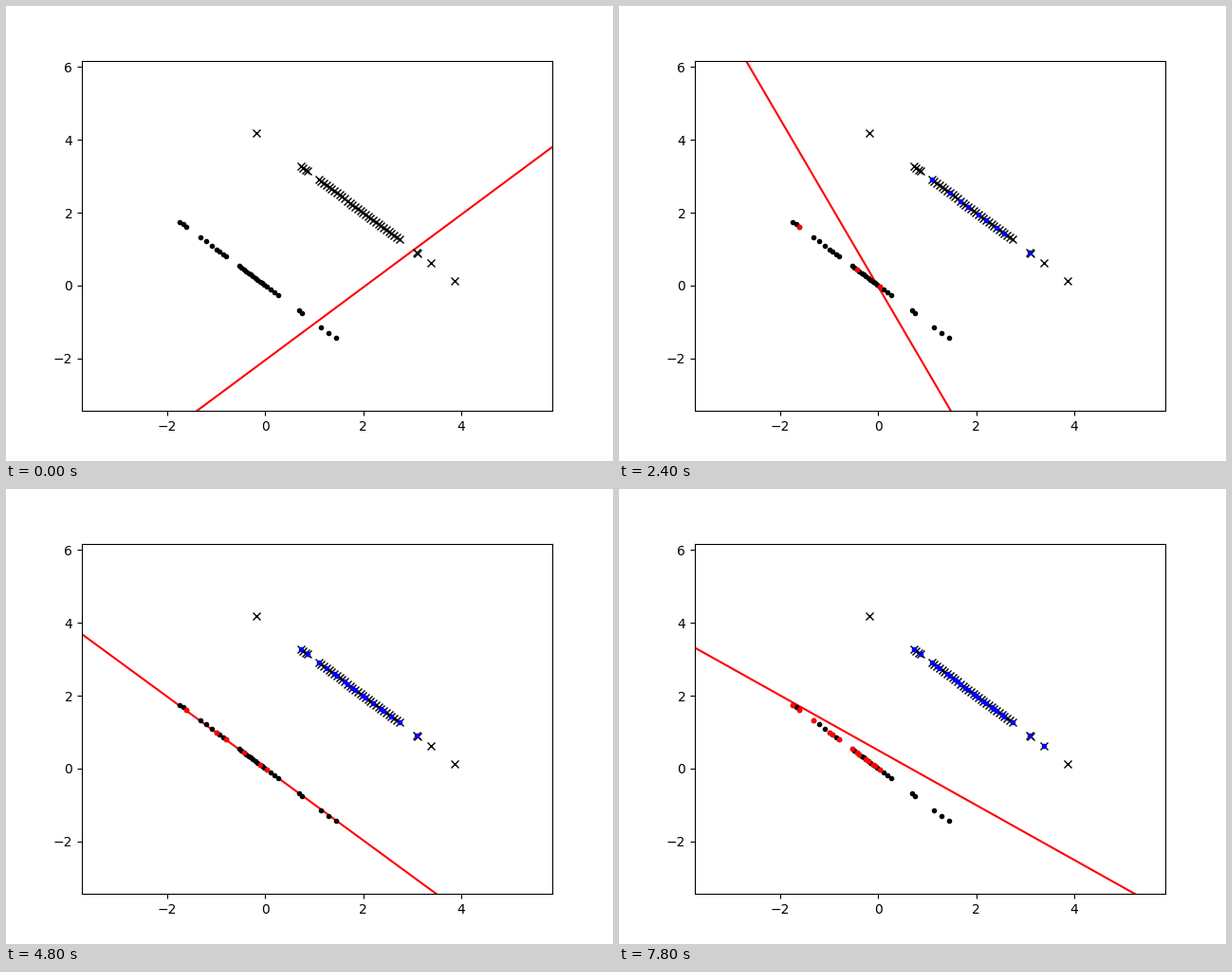
A matplotlib script that plays this animation: 640x480 px, repeating every 8 s.

```python
import numpy as np
import matplotlib.pyplot as plt
from matplotlib.animation import FuncAnimation

STEPS = 40
MARGIN = 2


def spread(*knots):
    """Sorted samples, evenly spaced between (index, x) knots."""
    index, x = zip(*knots)
    return np.interp(np.arange(index[-1] + 1), index, x)


def stride(start, jump, size):
    """Visit `size` samples in a scattered but fixed order."""
    return (start + jump * np.arange(size)) % size


# Dots lie on x + y = 0, crosses on x + y = 4.
dots = spread((0, -1.745), (2, -1.61), (3, -1.32), (6, -0.99), (9, -0.80),
              (10, -0.53), (22, 0.03), (25, 0.27), (26, 0.69), (27, 0.75),
              (28, 1.14), (30, 1.445))
crosses = spread((0, -0.175), (1, 0.73), (4, 0.865), (5, 1.09), (36, 2.74),
                 (37, 3.095), (38, 3.115), (39, 3.38), (40, 3.865))

# Order in which samples are picked; the outermost ones never are.
dot_picks = dots[stride(2, 10, 23)]
cross_picks = crosses[1:-1][stride(15, 7, 39)]

# Decision boundary: first step, slope, intercept
boundaries = [
    (0, 0.998, -2.05), (4, -1.061, -0.02), (11, -2.298, -0.034),
    (14, -1.456, 0), (19, -2.0, 0), (23, -0.985, 0), (27, -1.153, 0.9),
    (32, -2.091, 0.87), (35, -0.8, 0.7), (39, -0.752, 0.5)]

fig, ax = plt.subplots(figsize=(6.4, 4.8), dpi=100)
ax.set_xlim(dots.min() - MARGIN, crosses.max() + MARGIN)
ax.set_ylim(-dots.max() - MARGIN, 4 - crosses.min() + MARGIN)

span = np.array(ax.get_xlim())
line, = ax.plot([], [], "r-")
ax.plot(dots, -dots, "k.")
ax.plot(crosses, 4 - crosses, "kx")
seen_dots, = ax.plot([], [], "r.")
seen_crosses, = ax.plot([], [], "b.")


def update(step):
    _, slope, offset = max(b for b in boundaries if b[0] <= step)
    line.set_data(span, slope * span + offset)

    # One new sample per step, dots growing more frequent near the end
    count = int(np.interp(step, [0, 5, 24, 39], [0, 2, 6, 14]))
    d = dot_picks[:count]
    c = cross_picks[:step - count]
    seen_dots.set_data(d, -d)
    seen_crosses.set_data(c, 4 - c)
    return line, seen_dots, seen_crosses


anim = FuncAnimation(fig, update, frames=STEPS, interval=200,
                     repeat=True, repeat_delay=0)
plt.show()
```
